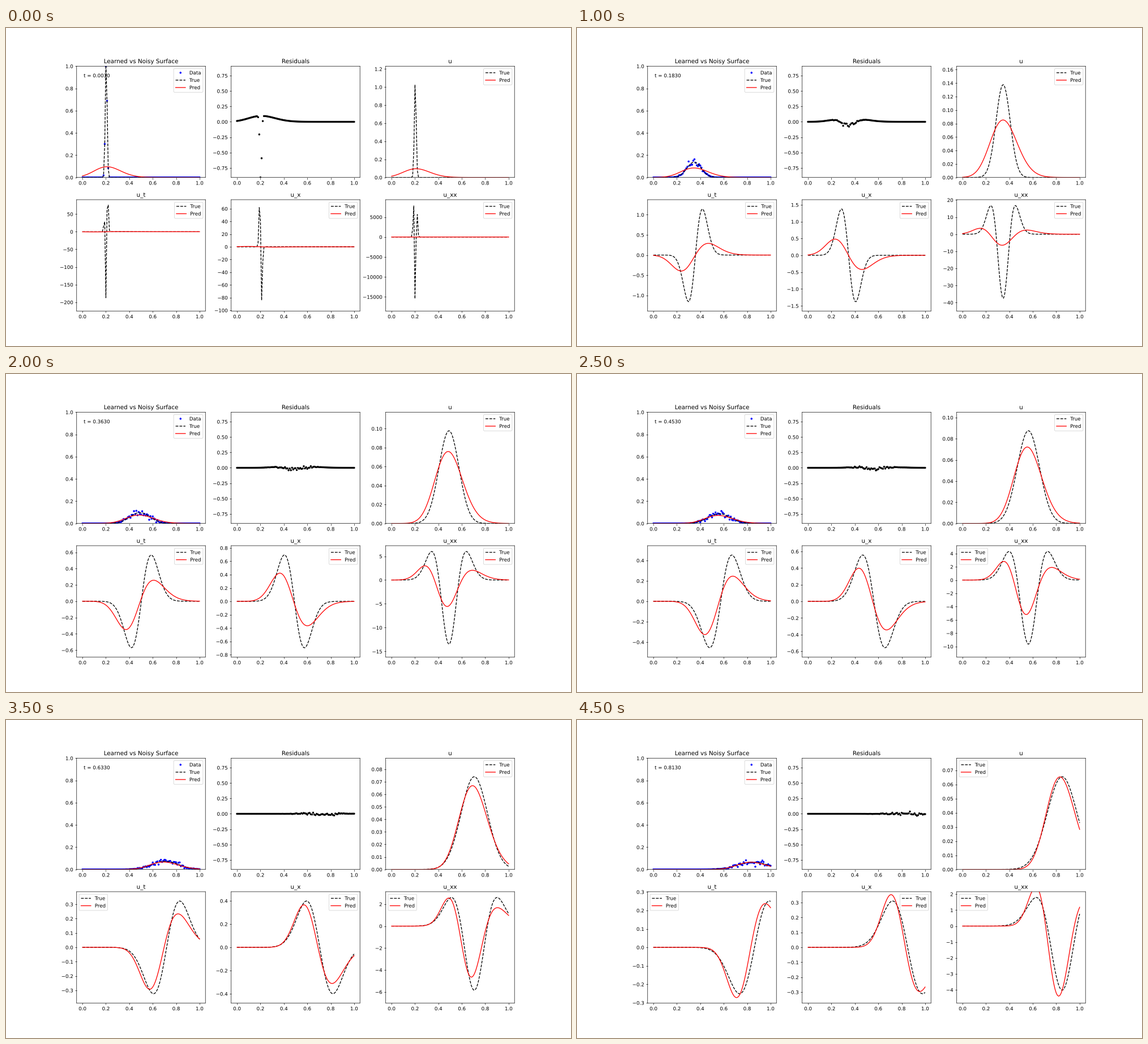
Recreate the animation shown at these times as a matplotlib script. Size 998 by 561 pixels, loop 5 s.

```python
import numpy as np
import matplotlib.pyplot as plt
from matplotlib import patheffects
from matplotlib.animation import FuncAnimation

DPI = 62.375
FRAMES = 10
TIMES = 0.003 + 0.09 * np.arange(FRAMES)
SPEED, DIFF, MASS = 0.8, 0.01, 0.0209
x = np.linspace(0, 1, 101)

# Sub-pixel placement for lines, markers and text
plt.rcParams.update({
    "path.snap": False,
    "text.hinting": "none",
    "path.effects": [patheffects.Normal()],
})


def true_fields(t):
    """Advection-diffusion pulse: u, u_t, u_x, u_xx."""
    var = 2 * DIFF * t
    d = x - 0.2 - SPEED * t
    u = MASS / np.sqrt(2 * np.pi * var) * np.exp(-d**2 / (2 * var))
    ux = -d / var * u
    uxx = (d**2 / var**2 - 1 / var) * u
    return u, DIFF * uxx - SPEED * ux, ux, uxx


def pred_parts(t):
    """Skewed bell with slowly drifting height, centre, width and skew."""
    amp = 0.09668 - 0.06607 * t + 0.01752 * t**2 + 0.02 * t**3
    mid = 0.207 + 0.755 * t + 0.0165 * t**2
    width = 0.113 + 0.0118 * t
    skew = 0.066 + 0.01 * t + 0.022 * t**2
    w = 1 + skew * (x - mid) / width
    z = np.log(w) / skew
    return amp * np.exp(-z**2 / 2), z, width * w, skew


def pred_fields(t, h=1e-4):
    u, z, sw, skew = pred_parts(t)
    ut = (pred_parts(t + h)[0] - pred_parts(t - h)[0]) / (2 * h)
    return u, ut, -u * z / sw, u * (z**2 + skew * z - 1) / sw**2


def noisy_data(i, u):
    """Scatter grows with u and levels off near the peak."""
    rng = np.random.default_rng(40 + i)
    spread = 0.3 * u / (1 + 6 * u)
    return np.clip(u + spread * rng.standard_normal(x.size), 0, 1)


fig, axes = plt.subplots(2, 3, figsize=(998 / DPI, 561 / DPI), dpi=DPI)
surface, resid, *panels = axes.flat

zero = np.zeros_like(x)
dots, = surface.plot(x, zero, "b.", label="Data")
true_line, = surface.plot(x, zero, "k--", label="True")
pred_line, = surface.plot(x, zero, "r-", label="Pred")
stamp = surface.text(0.01, 0.9, "")
surface.set_ylim(0, 1)
surface.set_title("Learned vs Noisy Surface")
surface.legend()

res_dots, = resid.plot(x, zero, "k.")
limit = 1 - pred_fields(TIMES[0])[0][20]
resid.set_ylim(-limit, limit)
resid.set_title("Residuals")

pairs = []
for ax, name in zip(panels, ("u", "u_t", "u_x", "u_xx")):
    pairs.append(ax.plot(x, zero, "k--", label="True")
                 + ax.plot(x, zero, "r-", label="Pred"))
    ax.set_title(name)
    ax.legend()


def update(i):
    t = TIMES[i]
    true, pred = true_fields(t), pred_fields(t)
    data = noisy_data(i, true[0])
    dots.set_ydata(data)
    true_line.set_ydata(true[0])
    pred_line.set_ydata(pred[0])
    stamp.set_text(f"t = {t:.4f}")
    res_dots.set_ydata(pred[0] - data)
    for ax, (a, b), ft, fp in zip(panels, pairs, true, pred):
        a.set_ydata(ft)
        b.set_ydata(fp)
        ax.set_ylim(1.2 * min(ft.min(), 0), 1.2 * ft.max())
    return []


anim = FuncAnimation(fig, update, frames=FRAMES, interval=500, repeat=True,
                     init_func=lambda: update(0))
plt.show()
```
